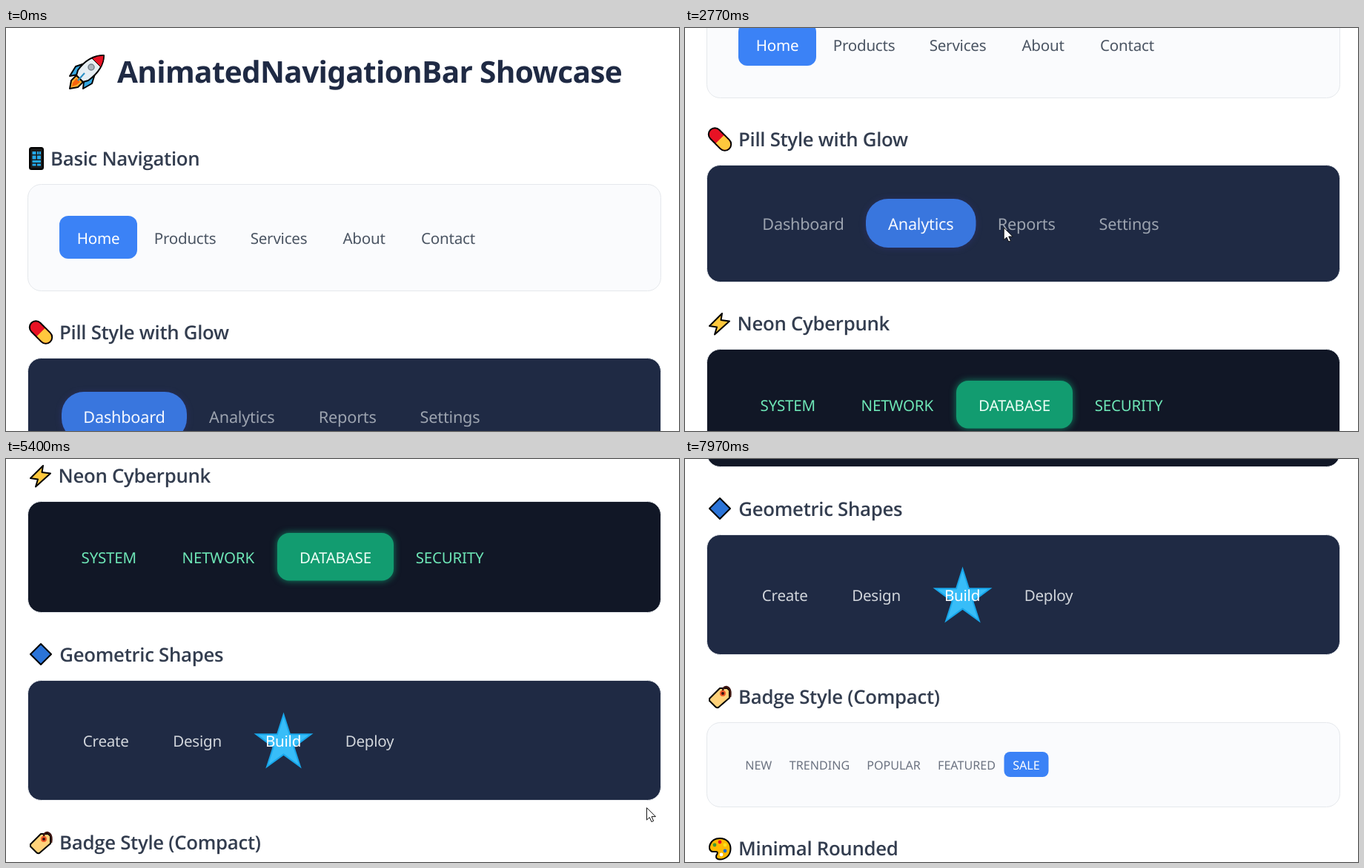
An HTML page for the animation above (8000 ms loop, 908 by 545 pixels).

```html
<!DOCTYPE html>
<html lang="en">
<head>
<meta charset="utf-8">
<title>Navigation bars</title>
<style>
html, body { margin: 0; width: 100%; height: 100%; overflow: hidden; background: #fff; }
svg { display: block; }
text { font-family: 'Noto Sans', 'Open Sans', sans-serif; text-rendering: geometricPrecision; }
.title { font-size: 40.5px; font-weight: 700; letter-spacing: -.65px; fill: #1f2a44; }
.head { font-family: 'Open Sans', 'Noto Sans', sans-serif; font-size: 25.8px; font-weight: 600; letter-spacing: -.3px; fill: #333d4f; }
.item { text-anchor: middle; }
.icon { stroke: #000; stroke-width: 2; stroke-linejoin: round; }
.bare { stroke: none; }
</style>
</head>
<body>
<svg width="908" height="545" viewBox="0 0 908 545">
  <g id="page">
    <text class="title" x="150" y="74">AnimatedNavigationBar Showcase</text>
    <g class="icon">
      <!-- rocket -->
      <path fill="#ffb02e" d="M95 64 88 71 86 82 97 80 104 73Z"/>
      <path class="bare" fill="#f7630c" d="M95 68 90 74 89 79 95 77 100 73Z"/>
      <path fill="#35a7e0" d="M106 48 94 52 86 65 97 63ZM120 62 116 75 104 82 105 72Z"/>
      <path fill="#e6eef3" d="M132 37C120 37 107 43 97 57L95 64 104 73 111 71C126 60 132 49 132 37Z"/>
      <path fill="#e81224" stroke-width="1" d="M132 37Q123 37 116 41L128 53Q132 45 132 37Z"/>
      <circle cx="115" cy="53" r="4" fill="#aab4bd" stroke="#75808a" stroke-width="1.5"/>
      <path fill="none" stroke="#2b8fc4" d="M97 71 106 61"/>
      <!-- phone -->
      <rect x="32" y="162" width="18" height="29" rx="2.5" fill="#1b1b1b"/>
      <path class="bare" fill="#24a9ea" d="M35.500 167h5v4h-5zM42 167h2.300v4h-2.300zM45 167h2v4h-2zM35.500 172.500h5v5h-5zM42 172.500h5v5h-5zM35.500 179h11.500v3h-11.500zM35.500 183.500h5v3h-5zM42 183.500h5v3h-5z"/>
      <!-- capsule -->
      <g transform="translate(47 411.500) rotate(45)">
        <rect x="-18" y="-8.500" width="36" height="17" rx="8.500" fill="#e81224"/>
        <path fill="#ffc83d" stroke="none" d="M0-7.500H9.500A7.500 7.500 0 0 1 9.500 7.500H0Z"/>
      </g>
      <!-- bolt -->
      <path fill="#ffc83d" d="M50 647 33 664 43 665.500 40 675.500 60 657.500 48.500 656Z"/>
      <!-- diamond -->
      <path fill="#2b74d8" d="M47 888 61 902 47 916 33 902Z"/>
      <!-- tag -->
      <path fill="#ffd27a" d="M33 1159 47 1145 57 1145 60 1148 60 1158 45 1171Q43 1172 41 1170L33 1162Z"/>
      <path fill="none" stroke="#3b1410" stroke-width="2.500" d="M51 1152Q50 1143 56 1143 63 1145 61 1157"/>
      <circle cx="51" cy="1152" r="3" fill="#3b1410" stroke="#f05a28"/>
      <!-- palette -->
      <path fill="#ffb900" d="M47 1348C56 1348 61.500 1354 61.500 1362 61.500 1371 55 1376.500 47 1376.500 41 1376 41 1372 43.500 1369 45 1365 40 1366 37 1366 29 1364 33 1348 47 1348Z"/>
      <g class="bare">
        <circle cx="47" cy="1353" r="2.400" fill="#e81224"/>
        <circle cx="40" cy="1357" r="2.400" fill="#3a9b35"/>
        <circle cx="54" cy="1357" r="2.400" fill="#f7e11e"/>
        <circle cx="54" cy="1365" r="2.400" fill="#1e6fd0"/>
        <circle cx="49" cy="1370" r="2.400" fill="#fff"/>
      </g>
    </g>
  </g>
  <path id="cursor" fill="#fff" stroke="#111" d="M0 0V16.500L3.800 13 6.500 19 9.200 17.800 6.600 12H12Z"/>
</svg>
<script>
const LOOP = 8000, MOVE = 300;
const page = document.getElementById('page');
const cursor = document.getElementById('cursor');

// Item i of a bar spans edges[i] to edges[i + 1]; moves are [start time, item].
const bars = [
  { top: 211.5, bottom: 355.5, fill: '#fafbfd', names: 'Home Products Services About Contact',
    edges: [72, 177, 306, 430, 536, 657], base: 292, size: 20.6, space: -.25,
    on: '#ffffff', off: '#4b5563', active: 0, mark: { y: 254, h: 58, r: 12, fill: '#3b82f6' } },
  { top: 446.5, bottom: 604.5, fill: '#1f2a44', names: 'Dashboard Analytics Reports Settings',
    edges: [75, 244, 392.5, 529, 669], base: 534, size: 21.7, space: -.22,
    on: '#f5f8ff', off: '#9ca3af', active: 0,
    mark: { y: 492, h: 66, r: 30, fill: '#3976de', glow: '0 1px 4px #3a3a9066' },
    moves: [[2050, 1], [2830, 2], [3520, 3], [3900, 0]] },
  { top: 695.5, bottom: 845.5, fill: '#111726', names: 'SYSTEM NETWORK DATABASE SECURITY',
    edges: [71, 206.5, 366, 523, 674], base: 779, size: 20.5, space: -.2,
    on: '#ecfdf5', off: '#6ee7b7', active: 2,
    mark: { y: 738, h: 64.5, r: 16, fill: '#129c70', glow: '0 0 5px #10b981aa' },
    moves: [[6200, 1], [6670, 0], [6870, 2]] },
  { top: 937.5, bottom: 1099.5, fill: '#1f2a44', names: 'Create Design Build Deploy',
    edges: [75, 194.5, 321.5, 426.5, 554.5], base: 1027, size: 20.6, space: -.25,
    on: '#ffffff', off: '#d1d5db', active: 2, star: [336, 983, 77, 78] },
  { top: 1191.5, bottom: 1305.5, fill: '#fafbfd', names: 'NEW TRENDING POPULAR FEATURED SALE',
    edges: [69, 129.5, 233.5, 329.5, 430.5, 490.5], base: 1255, size: 16.1, space: 0,
    on: '#ffffff', off: '#6b7280', active: 4, mark: { y: 1231, h: 34, r: 8, fill: '#3b82f6' } },
];
const heads = [
  ['Basic Navigation', 60, 186], ['Pill Style with Glow', 72, 421], ['Neon Cyberpunk', 70.5, 670],
  ['Geometric Shapes', 72.3, 911.5], ['Badge Style (Compact)', 72, 1165.5], ['Minimal Rounded', 72, 1371],
];
const starShape = [[50, 1], [61, 35], [98, 35], [68, 57], [79, 91], [50, 70], [21, 91], [32, 57], [2, 35], [39, 35]];

const scrollKeys = [
  [800, 0], [830, 12], [1100, 166], [1380, 261], [4797, 261], [4830, 276], [5100, 458],
  [5480, 652], [7700, 652], [7730, 665], [7970, 834], [8100, 930],
];
const cursorPaths = [
  [[1400, 887, 500], [1630, 502, 352], [1670, 489, 345], [1900, 330, 283], [2300, 310, 272],
   [2600, 330, 271], [2770, 430, 270], [3000, 455, 280], [3300, 470, 285], [3500, 600, 288],
   [3750, 640, 286], [3850, 670, 283], [4130, 693, 275], [4330, 908, 218]],
  [[5330, 887, 500], [5630, 680, 260], [5670, 663, 248], [5950, 420, 165], [6150, 300, 135],
   [6350, 260, 132], [6470, 150, 131], [6530, 124, 130], [6660, 124, 130], [6800, 180, 150],
   [7000, 500, 300], [7150, 717, 419]],
];

function add(tag, attrs, text = '') {
  const el = document.createElementNS('http://www.w3.org/2000/svg', tag);
  for (const k in attrs) el.setAttribute(k, attrs[k]);
  el.textContent = text;
  return page.appendChild(el);
}

function build(bar) {
  add('rect', { x: 29.5, y: bar.top, width: 854, height: bar.bottom - bar.top, rx: 18, fill: bar.fill, stroke: '#e5e8ec' });
  if (bar.star) {
    const [x, y, w, h] = bar.star;
    add('polygon', { points: starShape.map(([a, b]) => [x + a * w / 100, y + b * h / 100]).join(' '),
      fill: '#38bdf8', stroke: '#18a6ea', 'stroke-width': 2 });
  } else {
    const { y, h, r, fill, glow } = bar.mark;
    bar.rect = add('rect', { y, height: h, rx: r, fill });
    if (glow) bar.rect.style.filter = `drop-shadow(${glow})`;
  }
  bar.labels = bar.names.split(' ').map((name, i) => add('text', {
    class: 'item', x: (bar.edges[i] + bar.edges[i + 1]) / 2, y: bar.base,
    'font-size': bar.size, 'letter-spacing': bar.space }, name));
}

function ease(p) {
  const s = 1 - (1 - Math.min(1, Math.max(0, p))) ** 1.5;
  return s * s * (3 - 2 * s);
}

// Smooth curve through keys [time, ...values] without overshoot.
function track(keys, t, c = 1) {
  const last = keys.length - 1;
  if (t <= keys[0][0]) return keys[0][c];
  if (t >= keys[last][0]) return keys[last][c];
  const i = keys.findIndex(k => k[0] > t) - 1;
  const slope = j => (keys[j + 1][c] - keys[j][c]) / (keys[j + 1][0] - keys[j][0]);
  const tangent = j => {
    if (j === 0 || j === last) return 0;
    const a = slope(j - 1), b = slope(j);
    return a * b <= 0 ? 0 : 2 * a * b / (a + b);
  };
  const d = keys[i + 1][0] - keys[i][0], u = (t - keys[i][0]) / d, v = 1 - u;
  return keys[i][c] * v * v * (1 + 2 * u) + keys[i + 1][c] * u * u * (3 - 2 * u)
    + d * u * v * (tangent(i) * v - tangent(i + 1) * u);
}

function drawBar(bar, t) {
  let weights = bar.labels.map((_, i) => +(i === bar.active));
  for (const [start, item] of bar.moves || []) {
    const e = ease((t - start) / MOVE);
    weights = weights.map((w, i) => w * (1 - e) + (i === item) * e);
  }
  bar.labels.forEach((label, i) => {
    label.style.fill = `color-mix(in srgb, ${bar.on} ${weights[i] * 100}%, ${bar.off})`;
  });
  if (!bar.rect) return;
  const mix = shift => weights.reduce((sum, w, i) => sum + w * bar.edges[i + shift], 0);
  bar.rect.setAttribute('x', mix(0));
  bar.rect.setAttribute('width', mix(1) - mix(0));
}

function draw(t) {
  page.setAttribute('transform', `translate(0 ${-Math.round(track(scrollKeys, t))})`);
  bars.forEach(bar => drawBar(bar, t));
  const path = cursorPaths.find(p => t >= p[0][0] && t < p[p.length - 1][0]);
  cursor.style.display = path ? '' : 'none';
  if (path) cursor.setAttribute('transform', `translate(${track(path, t, 1)} ${track(path, t, 2)})`);
}

heads.forEach(([text, x, y]) => add('text', { class: 'head', x, y }, text));
bars.forEach(build);

const begin = performance.now();
function frame() {
  draw((performance.now() - begin) % LOOP);
  requestAnimationFrame(frame);
}
frame();
</script>
</body>
</html>
```
